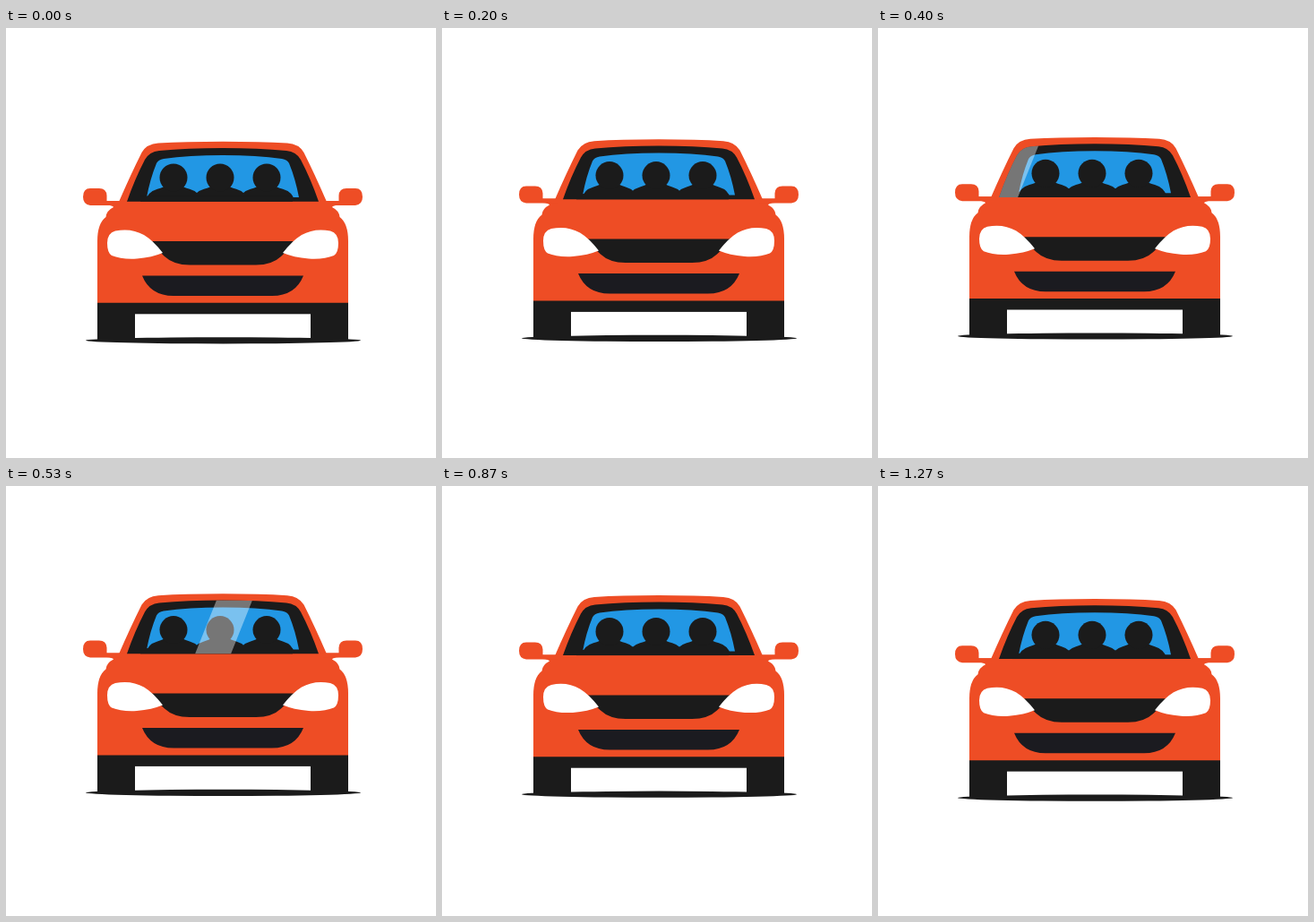
Write an HTML page with a canvas that moves like this. It is 480 by 480 pixels and loops after 1.34 s.

```html
<!DOCTYPE html>
<html lang="en">
<head>
<meta charset="utf-8">
<title>Carpool</title>
<style>
  html, body { margin: 0; width: 100%; height: 100%; overflow: hidden; background: #fff; }
  canvas { display: block; width: 100vmin; height: 100vmin; }
</style>
</head>
<body>
<canvas id="stage" width="480" height="480"></canvas>
<script>
const ctx = document.getElementById('stage').getContext('2d');
const ORANGE = '#ee4d25', BLACK = '#1b1b1b', BLUE = '#2297e4', WHITE = '#fff';
const LOOP = 1340, AXIS = 242, PEAK = 9, STEPS = 20, LIFT = 7.2;
const stepTimes = [0, 70, 140, 200, 270, 330, 400, 470, 530, 600,
  670, 730, 800, 870, 930, 1000, 1070, 1130, 1200, 1270];

// Joins a left half with its mirror image.
function symmetric(d) {
  const half = new Path2D(d);
  const whole = new Path2D(half);
  whole.addPath(half, new DOMMatrix([-1, 0, 0, 1, 2 * AXIS, 0]));
  return whole;
}

const roof = symmetric('M242 126.7 Q200 126.7 170 128.6 Q157 129.5 151.5 139 Q139 164 126 194 L118 208 H242 Z');
const body = symmetric('M242 193 H112 V197.5 Q119 198 120 200 Q112 204 111.5 211 Q102 218 102 238 V306.8 H242 Z');
const mirror = symmetric('M94 179 H104 Q112 179 112.5 187 V193 H130 V198 H94 Q86 197 86 188.5 Q86 179 94 179 Z');
const windshield = symmetric('M242 134 Q202 134 171 137 Q160 138 155 147 Q144 168 135 193.7 H242 Z');
const glass = symmetric('M242 142 Q204 142 176 146 Q170 147 168 151 Q161 168 157 189 H242 Z');
const headlight = symmetric('M113 240 Q113 229 122 226.5 Q140 223 154 231 Q164 237 175 251 Q163 256 146 257.5 Q129 258.5 118 254 Q113 251 113 240 Z');
const grille = symmetric('M242 238 H163 Q169 248 177 255 Q187 264.5 205 264.5 H242 Z');
const intake = symmetric('M242 276.5 H152 Q161 299 187 299 H242 Z');
const shoulders = new Path2D('M-31 26 Q-29 16 -18 12.8 Q-10 11 -9.5 8 H9.5 Q10 11 18 12.8 Q29 16 31 26 Z');

function fill(path, color) {
  ctx.fillStyle = color;
  ctx.fill(path);
}

function rect(x, y, w, h, color) {
  ctx.fillStyle = color;
  ctx.fillRect(x, y, w, h);
}

function drawPerson(x) {
  ctx.save();
  ctx.translate(x, 167);
  fill(shoulders, BLACK);
  ctx.beginPath();
  ctx.arc(0, 0, 15.5, 0, Math.PI * 2);
  ctx.fill();
  ctx.restore();
}

function drawGlare(step) {
  const right = 156 + (step - 6) * 47.5;
  const left = right - 40;
  const slant = 24;
  ctx.save();
  ctx.clip(windshield);
  fill(new Path2D(`M${left} 194 L${left + slant} 134 H${right + slant} L${right} 194 Z`), 'rgba(255,255,255,0.4)');
  ctx.restore();
}

function drawCar(step) {
  ctx.fillStyle = BLACK;
  ctx.beginPath();
  ctx.ellipse(242.5, 348.8, 153.5, 3.6, 0, 0, Math.PI * 2);
  ctx.fill();
  rect(102, 306, 280, 13.3, BLACK);
  rect(102, 306, 42, 42, BLACK);
  rect(340, 306, 42, 42, BLACK);

  fill(roof, ORANGE);
  fill(body, ORANGE);
  fill(mirror, ORANGE);
  fill(windshield, BLACK);
  fill(glass, BLUE);
  [187, 239, 291].forEach(drawPerson);
  rect(150, 187.5, 170, 6.2, BLACK);
  drawGlare(step);

  fill(grille, BLACK);
  fill(headlight, WHITE);
  fill(intake, '#1b1b20');
}

function draw(now) {
  const time = now % LOOP;
  const step = stepTimes.findLastIndex(start => start <= time + 0.01);
  const lift = LIFT * (step < PEAK ? step / PEAK : (STEPS - step) / (STEPS - PEAK));
  rect(0, 0, 480, 480, WHITE);
  ctx.save();
  ctx.translate(0, -lift);
  drawCar(step);
  ctx.restore();
}

let begin;
function tick(now) {
  begin ??= now;
  draw(now - begin);
  requestAnimationFrame(tick);
}
draw(0);
requestAnimationFrame(tick);
</script>
</body>
</html>
```
